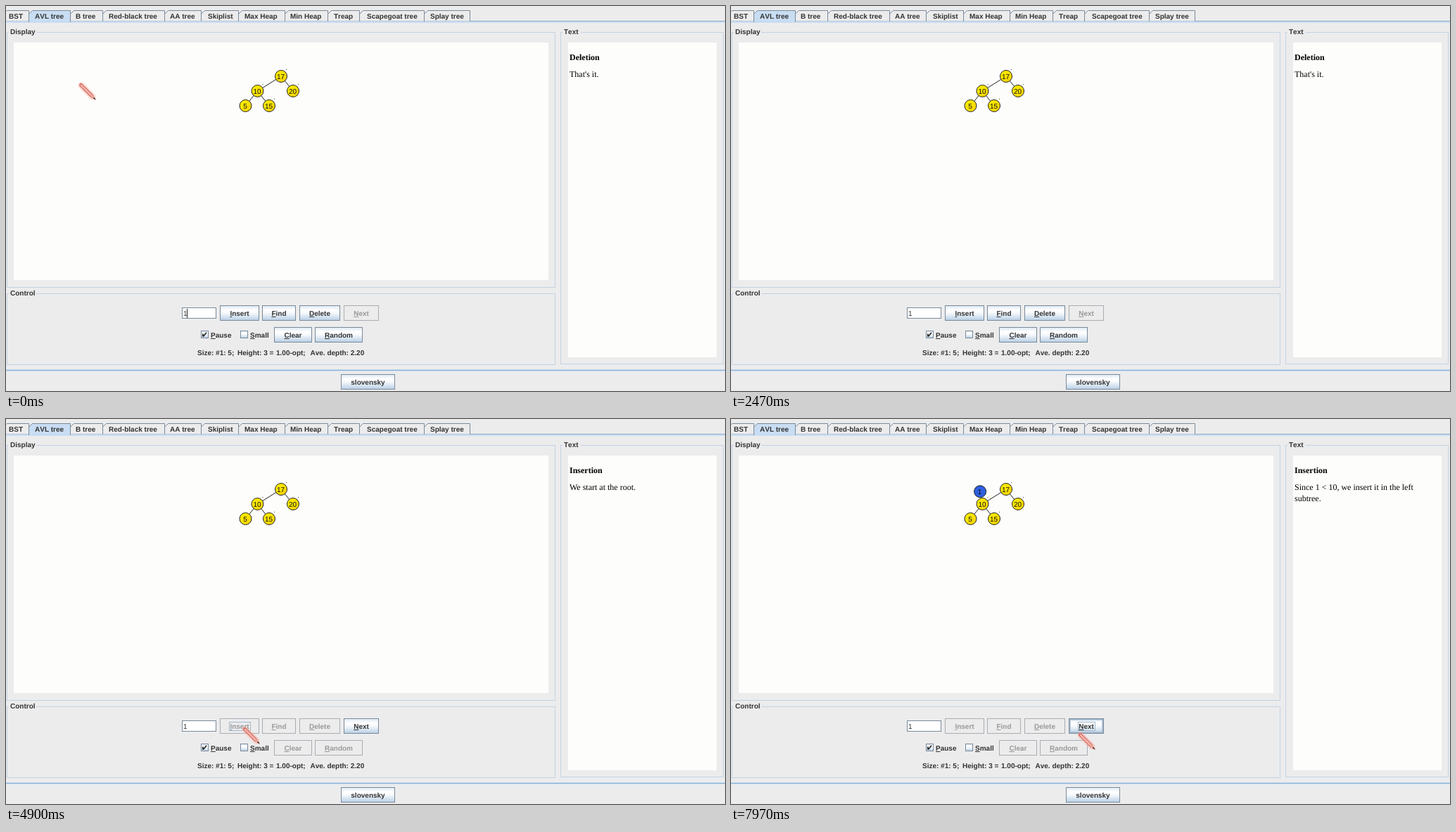
An HTML page that plays this animation: 1022x548 px, repeating every 8 s.

```html
<!DOCTYPE html>
<html lang="en">
<head>
<meta charset="utf-8">
<title>AVL tree insertion</title>
<style>
html, body { margin: 0; width: 100%; height: 100%; overflow: hidden; background: #ececed; }
svg { display: block; width: 1022px; height: 548px; }
text { font: bold 10px "Liberation Sans", Arial, sans-serif; fill: #333; white-space: pre;
  font-kerning: none; text-rendering: geometricPrecision; }
.mid { text-anchor: middle; }
.key { font-weight: normal; fill: #111; text-anchor: middle; }
.plain { font-weight: normal; }
.note { font: 12px "Liberation Serif", Times, serif; fill: #000; }
.note.head { font-weight: bold; }
.u { text-decoration: underline; }
.line { fill: none; stroke: #c3d2e2; }
.box { stroke: #7a8a99; fill: url(#ocean); }
.hover, .focus { fill: none; stroke: #a3b8cc; visibility: hidden; }
.hover { stroke-width: 1.7; }
.off .box { fill: #ececed; stroke: #a9adb2; }
.off text { fill: #999; }
.over .hover, .focused .focus { visibility: visible; }
</style>
</head>
<body>
<svg id="stage" viewBox="0 0 1022 548">
  <defs>
    <linearGradient id="ocean" x2="0" y2="1">
      <stop offset="0" stop-color="#dde8f3"/><stop offset=".3" stop-color="#fff"/>
      <stop offset=".5" stop-color="#f6f9fc"/><stop offset="1" stop-color="#b8cfe5"/>
    </linearGradient>
    <linearGradient id="gold" x2="1" y2="1">
      <stop offset="0" stop-color="#fff200"/><stop offset="1" stop-color="#f3cf00"/>
    </linearGradient>
    <clipPath id="view"><rect x="11" y="52" width="760" height="338"/></clipPath>
  </defs>
</svg>
<script>
const LOOP = 8000;
const stage = document.getElementById('stage');
const out = [];
const add = s => out.push(s);
const text = (x, y, s, cls = '', id = '') => `<text x="${x}" y="${y}" class="${cls}" id="${id}">${s}</text>`;
const rect = (x, y, w, h, attrs) => `<rect x="${x}" y="${y}" width="${w}" height="${h}" ${attrs}/>`;
const mnemonic = s => `<tspan class="u">${s[0]}</tspan>${s.slice(1)}`;

// Tabs: label, label x, left edge, right edge
const tabs = [
  ['BST', 4, -4, 32], ['AVL tree', 41, 32, 91], ['B tree', 99, 91, 137],
  ['Red-black tree', 146, 137, 225], ['AA tree', 233, 225, 277], ['Skiplist', 287, 277, 330],
  ['Max Heap', 339, 330, 396], ['Min Heap', 404, 396, 457], ['Treap', 466, 457, 502],
  ['Scapegoat tree', 513, 502, 594], ['Splay tree', 603, 594, 659]
];
add(rect(0, 21, 1022, 3, 'fill="#c8ddf2"') + rect(0, 21, 1022, 1, 'fill="#8fa9c4"'));
tabs.forEach(([label, tx, x, r], i) => {
  const on = i === 1;
  add(`<path d="M${x + .5} ${on ? 23 : 21.5}V11.5L${x + 5.5} 6.5H${r + .5}V${on ? 23 : 21.5}"
    fill="${on ? '#c8ddf2' : '#ececed'}" stroke="#7a8a99"/>`);
  add(text(tx, 18, label));
});
add(rect(0, 517, 1022, 3, 'fill="#c8ddf2"') + rect(0, 518, 1022, 1, 'fill="#8fb0d2"'));

function panel(x, y, w, h, title, titleWidth) {
  add(rect(x + .5, y + .5, w, h, 'class="line"'));
  add(rect(x + 3, y - 2, titleWidth + 4, 5, 'fill="#ececed"') + text(x + 5, y + 3, title));
}
panel(1, 37, 779, 363, 'Display', 35);
panel(1, 409, 779, 101, 'Control', 35);
panel(788, 37, 231, 472, 'Text', 22);
add(rect(11, 52, 760, 338, 'fill="#fdfdfc"') + rect(799, 52, 211, 448, 'fill="#fdfdfc"'));
add(text(801, 77, '', 'note head', 'head') + text(801, 101, '', 'note', 'line1') + text(801, 117, '', 'note', 'line2'));

// Buttons: left, top, width, label width
const BUTTON_H = 22;
const buttons = {
  Insert: [304, 426, 56, 29], Find: [364, 426, 48, 21], Delete: [417, 426, 58, 31],
  Next: [480, 426, 50, 23], Clear: [381, 457, 54, 26], Random: [439, 457, 68, 40],
  slovensky: [476, 524, 77, 48]
};
for (const [name, [x, y, w, tw]] of Object.entries(buttons)) {
  const cx = x + w / 2, h = BUTTON_H;
  add(`<g id="${name}">` + rect(x + .5, y + .5, w - 1, h - 1, 'class="box"') +
    rect(x + 1.8, y + 1.8, w - 3.6, h - 3.6, 'class="hover"') +
    rect(Math.round(cx - tw / 2) - .5, y + 5.5, tw + 1, 12, 'class="focus"') +
    text(cx, y + 15, name === 'slovensky' ? name : mnemonic(name), 'mid') + '</g>');
}

add(rect(250.5, 429.5, 48, 15, 'fill="#fff" stroke="#7a8a99"') + text(252, 441, '1', 'plain'));
add(rect(257, 431, 1, 13, 'id="caret" fill="#222"'));
for (const [x, label, tx] of [[277, 'Pause', 291], [333, 'Small', 347]])
  add(rect(x + .5, 462.5, 10, 10, 'class="box"') + text(tx, 472, mnemonic(label)));
add('<path d="M279.8 466.5V470.5M280.3 470.5L285 464.8" fill="none" stroke="#222" stroke-width="1.7"/>');
for (const [x, s] of [[272, 'Size: #1: 5;'], [329, 'Height: 3 ='], [384, '1.00-opt;'], [432.5, 'Ave. depth: 2.20']])
  add(text(x, 497, s));

// Tree: key, x, y, parent index
const tree = [[17, 391, 100], [10, 357.5, 121, 0], [20, 408, 121, 0], [5, 340.5, 142, 1], [15, 374, 142, 1]];
const node = (key, x, y, fill) =>
  `<circle cx="${x}" cy="${y}" r="8.5" fill="${fill}" stroke="#222"/>` + text(x - .5, y + 4, key, 'key');
for (const [, x, y, p] of tree)
  if (p !== undefined) add(`<path d="M${tree[p][1]} ${tree[p][2]}L${x} ${y}" stroke="#222"/>`);
for (const [key, x, y] of tree) {
  add(node(key, x, y, 'url(#gold)'));
  if (key !== 5) add(rect(x + 7, y - 10, 1, 1, 'fill="#444"'));
}
add(`<g clip-path="url(#view)"><g id="fresh">${node(1, 0, 0, '#2f5fdf')}</g></g>`);

// Pencil pointer, hot spot at 0,0
const stroke = (d, color, w, o = 1) =>
  `<path d="${d}" stroke="${color}" stroke-width="${w}" stroke-opacity="${o}" stroke-linecap="round"/>`;
add('<g id="pencil">' + stroke('M3 3L19 19', '#ffb8a8', 10, .22) + stroke('M3 3L19 19', '#f7a598', 7.5, .35) +
  stroke('M2.5 2.5L18 18', '#d9756c', 5) + stroke('M3 3L17.5 17.5', '#f5b9b0', 2.4) +
  '<path d="M16 19.8L19.8 16L23.5 23.5Z" fill="#e3a596"/><path d="M19.8 21.6L21.6 19.8L24 24Z" fill="#57302c"/></g>');

stage.insertAdjacentHTML('beforeend', out.join(''));
const $ = id => document.getElementById(id);

// Pointer path: time, x, y
const path = [
  [0, 104, 110], [760, 89, 179], [1200, 92, 255], [1600, 92, 255], [2350, 165, 556], [2580, 300, 556],
  [3150, 385, 475], [3630, 373, 457], [4300, 337, 439], [5300, 337, 439], [6150, 494, 447], [LOOP, 494, 447]
];
function pointer(t) {
  const i = path.findIndex(p => p[0] > t);
  const [t0, x0, y0] = path[i - 1], [t1, x1, y1] = path[i];
  const u = (t - t0) / (t1 - t0), e = u * u * (3 - 2 * u);
  return [x0 + (x1 - x0) * e, y0 + (y1 - y0) * e];
}

// New node hops in ten equal steps: start time, from, to
const STEP = 60;
const moves = [
  [4915, 11, 52, 391, 78], [6610, 391, 78, 357.5, 99], [7840, 357.5, 99, 340.5, 120]
];
const left = k => ['Insertion', `Since 1 &lt; ${k}, we insert it in the left`, 'subtree.'];
const notes = [
  [0, ['Deletion', "That's it.", '']], [4700, ['Insertion', 'We start at the root.', '']],
  [6580, left(17)], [7810, left(10)]
];
const CLICK_INSERT = 4700, CLICK_NEXT = 6500;
const latest = (list, t) => list.filter(e => e[0] <= t).pop();
let shown;

function draw(t) {
  const [px, py] = pointer(t);
  $('pencil').setAttribute('transform', `translate(${px} ${py})`);

  const busy = t >= CLICK_INSERT;
  for (const [name, [x, y, w]] of Object.entries(buttons)) {
    const off = name !== 'slovensky' && (name === 'Next') !== busy;
    const over = !off && px > x && px < x + w && py > y && py < y + BUTTON_H;
    const focus = name === (t >= CLICK_NEXT ? 'Next' : busy ? 'Insert' : '');
    $(name).setAttribute('class', [off && 'off', over && 'over', focus && 'focused'].filter(Boolean).join(' '));
  }
  $('caret').style.visibility = !busy && (t + 300) % 1000 < 500 ? 'visible' : 'hidden';

  const note = latest(notes, t)[1];
  if (note !== shown) {
    ['head', 'line1', 'line2'].forEach((id, i) => $(id).innerHTML = note[i]);
    shown = note;
  }

  const move = latest(moves, t);
  $('fresh').style.visibility = move ? 'visible' : 'hidden';
  if (move) {
    const [t0, x0, y0, x1, y1] = move;
    const u = Math.min(10, Math.floor((t - t0) / STEP)) / 10;
    $('fresh').setAttribute('transform', `translate(${x0 + (x1 - x0) * u} ${y0 + (y1 - y0) * u})`);
  }
}

const start = performance.now();
function tick() {
  draw((performance.now() - start) % LOOP);
  requestAnimationFrame(tick);
}
tick();
</script>
</body>
</html>
```
